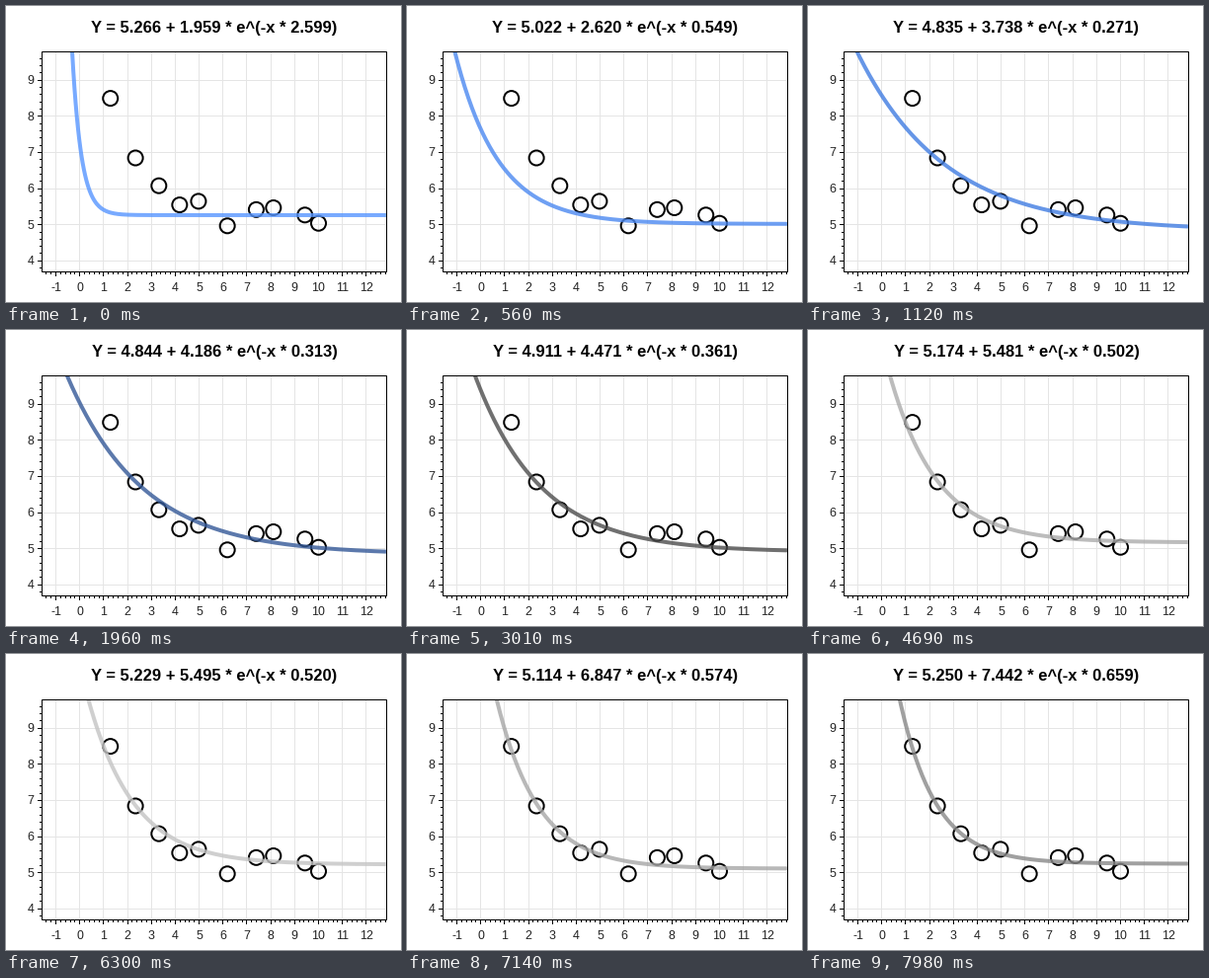
These frames come from a looping animation (400x300 px, 8 s). A matplotlib script:

```python
import numpy as np
import matplotlib.pyplot as plt
from matplotlib.animation import FuncAnimation
from matplotlib.collections import LineCollection
from matplotlib.patches import Circle, Rectangle

W, H, DPI = 400, 300, 100
LOOP, TICK, STEP = 8000, 20, 70
PX = 72 / DPI  # points per pixel
ALPHA = 0.8

LEFT, TOP, RIGHT, BOTTOM = 36, 46, 385, 269
X0, DX = 74.8, 24.17
Y5, DY = 221.7, 36.6

# time, offset, amplitude, rate, grey level, blueness
KEYS = np.array([
    (0, 5.266, 1.959, 2.599, 120, 135),
    (840, 4.900, 2.950, 0.252, 106, 132),
    (1120, 4.835, 3.738, 0.271, 102, 130),
    (1960, 4.844, 4.186, 0.313, 92, 80),
    (3010, 4.911, 4.471, 0.361, 112, 0),
    (4690, 5.174, 5.481, 0.502, 188, 0),
    (6300, 5.229, 5.495, 0.520, 208, 0),
    (6650, 5.035, 6.500, 0.530, 198, 0),
    (7980, 5.250, 7.442, 0.659, 160, 0),
])

DATA = [(1.28, 8.50), (2.33, 6.85), (3.31, 6.08), (4.18, 5.55), (4.97, 5.65),
        (6.18, 4.97), (7.39, 5.42), (8.11, 5.47), (9.43, 5.27), (10, 5.04)]


def px(x):
    return X0 + DX * x


def py(y):
    return Y5 - DY * (y - 5)


def col(x):
    return np.floor(px(x))


def row(y):
    return np.floor(py(y))


def state(t):
    """Fit parameters and curve colour; the rate moves geometrically."""
    time, a, b, k, grey, blue = KEYS.T
    a, b, log_k, grey, blue = (np.interp(t, time, v)
                               for v in (a, b, np.log(k), grey, blue))
    seen = np.array([grey, grey + 0.37 * blue, grey + blue]) / 255
    return a, b, np.exp(log_k), 1 - (1 - seen) / ALPHA


fig = plt.figure(figsize=(W / DPI, H / DPI), dpi=DPI, facecolor="white")
ax = fig.add_axes([0, 0, 1, 1])
ax.set(xlim=(0, W), ylim=(H, 0))
ax.axis("off")


def add_lines(segs, color, z):
    ax.add_collection(LineCollection(segs, colors=color, linewidths=PX,
                                     antialiaseds=False, zorder=z))


def x_ticks(values, size):
    return [[(col(x), BOTTOM), (col(x), BOTTOM + size)] for x in values]


def y_ticks(values, size):
    return [[(LEFT - size, row(y)), (LEFT, row(y))] for y in values]


def frame(**style):
    return Rectangle((LEFT, TOP), RIGHT - LEFT, BOTTOM - TOP, **style)


xs, ys = range(-1, 13), range(4, 10)
add_lines([[(col(x), TOP), (col(x), BOTTOM)] for x in xs]
          + [[(LEFT, row(y)), (RIGHT, row(y))] for y in ys], "#e5e5e5", 1)
add_lines(x_ticks(xs, 4) + x_ticks(np.arange(-7, 65) / 5, 2)
          + y_ticks(ys, 4) + y_ticks(np.arange(19, 49) / 5, 2), "black", 4)
ax.add_patch(frame(fill=False, ec="black", lw=PX, zorder=4))

label = dict(family="Liberation Sans", size=12.4 * PX, color="#222222",
             va="baseline")
for x in xs:
    ax.text(px(x), 289, str(x), ha="center", **label)
for y in ys:
    ax.text(28, py(y) + 4, str(y), ha="right", **label)

for x, y in DATA:
    ax.add_patch(Circle((px(x), py(y)), 7.5, fill=False, ec="black",
                        lw=2 * PX, zorder=2))

title = ax.text(211, 27, "", ha="center", va="baseline", color="black",
                family="Liberation Sans", weight="bold", size=16.5 * PX)
grid = np.linspace(-1.7, 13, 300)
curve, = ax.plot([], [], lw=4 * PX, alpha=ALPHA, zorder=3)
curve.set_clip_path(frame(transform=ax.transData))


def draw(i):
    t = (i * TICK + TICK // 2) // STEP * STEP
    a, b, k, color = state(t)
    curve.set_data(px(grid), py(a + b * np.exp(-k * grid)))
    curve.set_color(np.clip(color, 0, 1))
    title.set_text(f"Y = {a:.3f} + {b:.3f} * e^(-x * {k:.3f})")
    return curve, title


anim = FuncAnimation(fig, draw, frames=LOOP // TICK, interval=TICK,
                     repeat=True, repeat_delay=0)
plt.show()
```
